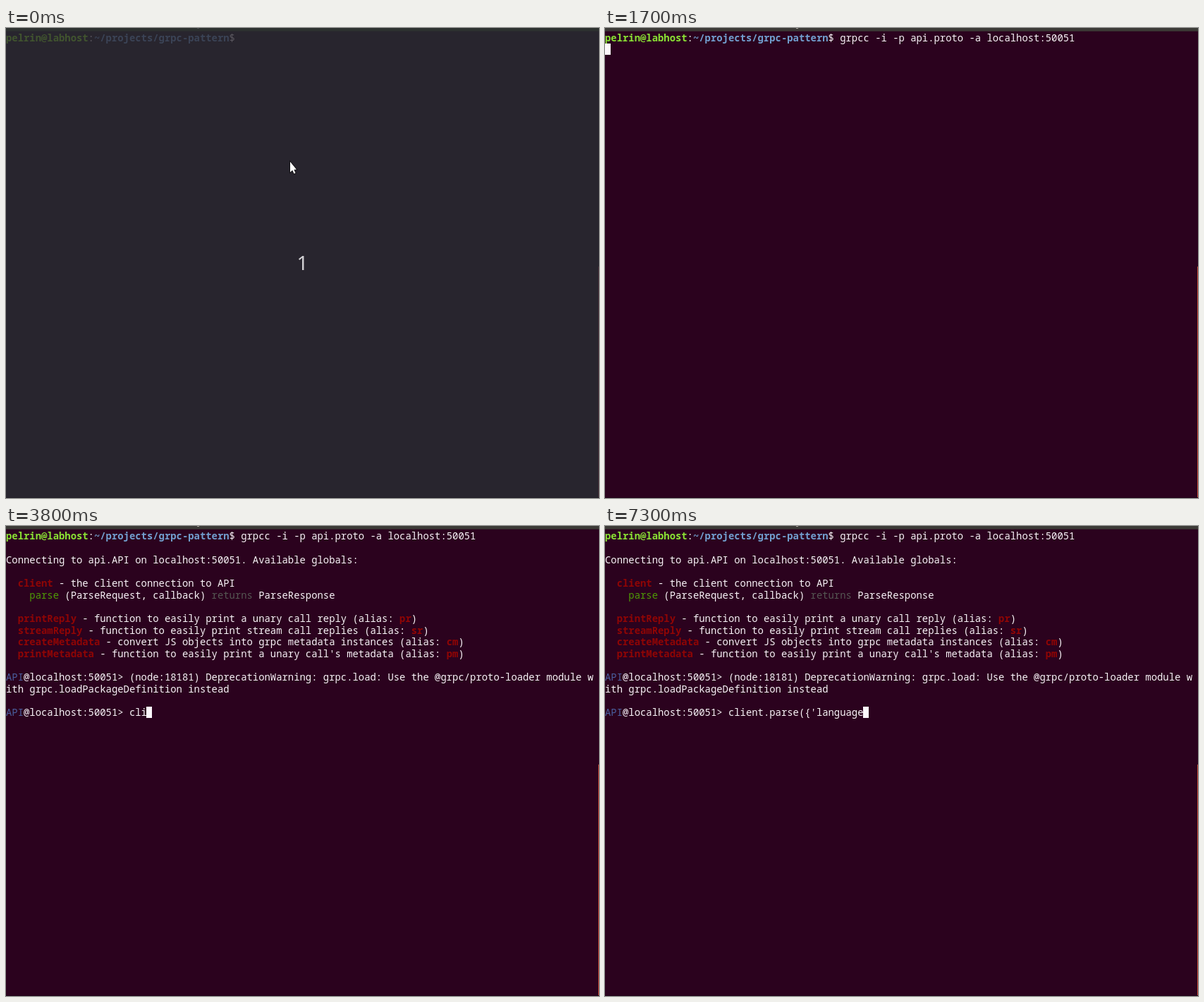
An HTML page with a canvas that plays this animation: 841x666 px, repeating every 8000 ms.

```html
<!DOCTYPE html>
<html lang="en">
<head>
<meta charset="utf-8">
<title>Terminal session</title>
<style>
  html, body { margin: 0; width: 100%; height: 100%; overflow: hidden; background: #2b021e; }
  canvas { display: block; }
</style>
</head>
<body>
<canvas id="stage" width="841" height="666"></canvas>
<script>
const ctx = document.getElementById('stage').getContext('2d');
const LOOP = 8000, CELL_W = 8.33, CELL_H = 16.66, TOP = 5.6;
const MONO = '"Noto Sans Mono", "DejaVu Sans Mono", monospace';

// Each style is [colour, weight].
const STYLES = {
  text: ['#f8f4f7', 400],
  user: ['#8ae234', 700],
  path: ['#729fcf', 700],
  red: ['#8f0505', 700],
  green: ['#4e9a06', 400],
  grey: ['#555753', 400],
  blue: ['#4a5f9f', 400]
};

const PROMPT = [['user', 'pelrin@labhost'], ['text', ':'], ['path', '~/projects/grpc-pattern'], ['text', '$ ']];
const COMMAND = 'grpcc -i -p api.proto -a localhost:50051';
const REPL = [['blue', 'API'], ['text', '@localhost:50051> ']];
const CALL = "client.parse({'language";

const helper = (name, text, alias) =>
  [['text', '  '], ['red', name], ['text', ` - ${text} (alias: `], ['red', alias], ['text', ')']];

const OUTPUT = [
  [],
  [['text', 'Connecting to api.API on localhost:50051. Available globals:']],
  [],
  [['text', '  '], ['red', 'client'], ['text', ' - the client connection to API']],
  [['text', '    '], ['green', 'parse'], ['text', ' (ParseRequest, callback) '], ['grey', 'returns'], ['text', ' ParseResponse']],
  [],
  helper('printReply', 'function to easily print a unary call reply', 'pr'),
  helper('streamReply', 'function to easily print stream call replies', 'sr'),
  helper('createMetadata', 'convert JS objects into grpc metadata instances', 'cm'),
  helper('printMetadata', "function to easily print a unary call's metadata", 'pm'),
  [],
  [...REPL, ['text', '(node:18181) DeprecationWarning: grpc.load: Use the @grpc/proto-loader module w']],
  [['text', 'ith grpc.loadPackageDefinition instead']]
];

// [time, characters of the call typed so far]
const KEYS = [
  [3500, 1], [3600, 2], [3800, 3], [4000, 5], [4100, 6], [4400, 8], [4600, 9],
  [4800, 10], [4900, 11], [5000, 12], [5500, 13], [6000, 14], [6500, 15], [6600, 16],
  [6800, 17], [6900, 18], [7000, 19], [7100, 21], [7200, 22], [7300, 23]
];

const within = (t, from, to) => t >= from && t < to;

function rect(color, x, y, w, h) {
  ctx.fillStyle = color;
  ctx.fillRect(x, y, w, h);
}

// Draws styled runs on the character grid and returns the next free column.
function drawLine(row, runs) {
  let col = 0;
  for (const [style, text] of runs) {
    const [color, weight] = STYLES[style];
    ctx.fillStyle = color;
    ctx.font = `${weight} 13.88px ${MONO}`;
    for (const char of text) {
      ctx.fillText(char, col * CELL_W, TOP + 13.7 + row * CELL_H);
      col++;
    }
  }
  return col;
}

function drawBlock(col, row) {
  rect('#fdf8fc', Math.floor(col * CELL_W), Math.round(TOP + row * CELL_H), 8, 16);
}

function drawBeam() {
  rect('#d8d0d6', 404, 186, 1, 12);
  rect('#d8d0d6', 402, 185, 2, 1);
  rect('#d8d0d6', 405, 185, 2, 1);
  rect('#d8d0d6', 402, 198, 2, 1);
  rect('#d8d0d6', 405, 198, 2, 1);
}

function drawArrow() {
  const points = [[403, 189.5], [403, 204.5], [406.2, 201.6], [408.5, 206.6], [410.6, 205.6], [408.4, 200.8], [412, 200.5]];
  ctx.beginPath();
  points.forEach(([x, y]) => ctx.lineTo(x, y));
  ctx.closePath();
  ctx.lineWidth = 1.6;
  ctx.strokeStyle = '#0b0a0d';
  ctx.stroke();
  ctx.fillStyle = '#ffffff';
  ctx.fill();
}

function drawWindow(dim) {
  rect(dim ? '#28252e' : '#2b021e', 0, 0, 841, 666);
  rect(dim ? '#2d3230' : '#3c3b37', 0, 0, 841, 4);
  rect(dim ? '#2a2b2e' : '#35252c', 0, 4, 841, 1);
  rect(dim ? '#4b4d50' : '#aaa69e', 271, 0, 3, 1);
  rect(dim ? '#49303a' : '#c8503c', 840, 338, 1, 328);
  rect(dim ? '#222028' : '#21051a', 0, 665, 841, 1);
}

function drawCountdown() {
  ctx.globalAlpha = 0.25;
  drawLine(0, PROMPT);
  ctx.globalAlpha = 1;
  ctx.fillStyle = '#d3d2d5';
  ctx.font = '28px "Noto Sans", "Open Sans", sans-serif';
  ctx.textAlign = 'center';
  ctx.fillText('1', 420.5, 343);
  ctx.textAlign = 'left';
  drawArrow();
}

function drawShell(t) {
  const typed = t < 500 ? '' : t < 1000 ? 'clear' : COMMAND;
  const end = drawLine(0, [...PROMPT, ['text', typed]]);
  if (t < 300) drawBeam();
  if (within(t, 300, 1200) || within(t, 1400, 1700)) drawBlock(end, 0);
  if (within(t, 1700, 2000)) drawBlock(0, 1);
}

function drawRepl(t) {
  OUTPUT.forEach((runs, i) => drawLine(i + 1, runs));
  if (t < 3000) {
    if (!within(t, 2500, 2600)) drawBlock(0, 14);
    return;
  }
  const count = KEYS.reduce((n, [time, length]) => t >= time ? length : n, 0);
  const end = drawLine(15, [...REPL, ['text', CALL.slice(0, count)]]);
  if (!within(t, 3200, 3500)) drawBlock(end, 15);
}

function render(t) {
  const dim = t < 100;
  drawWindow(dim);
  if (dim) return drawCountdown();
  drawShell(t);
  if (t >= 2000) drawRepl(t);
}

let start;
function tick(now) {
  start ??= now;
  render((now - start) % LOOP);
  requestAnimationFrame(tick);
}
render(0);
requestAnimationFrame(tick);
</script>
</body>
</html>
```
